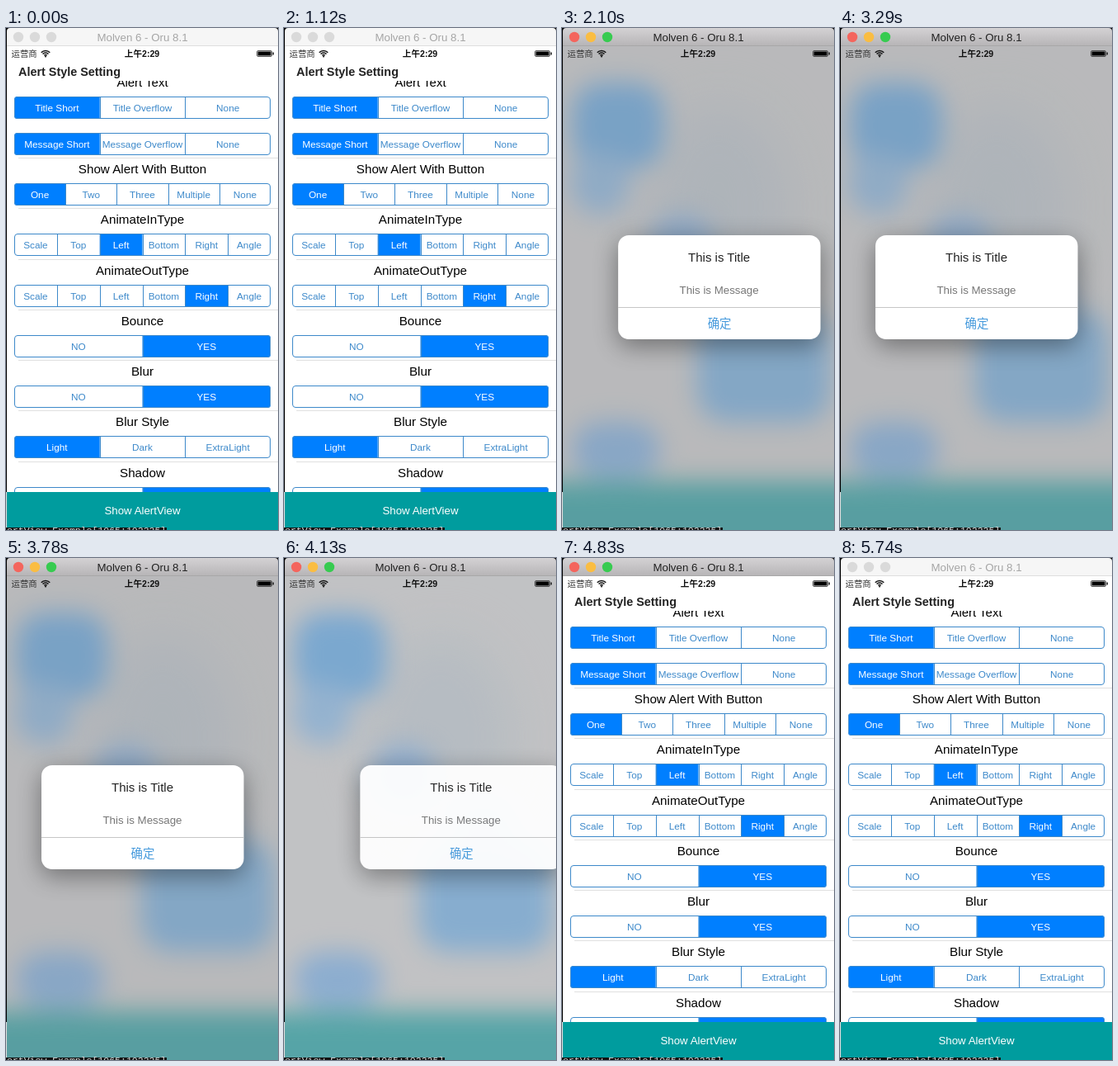
An HTML page that plays this animation: 330x608 px, repeating every 5810 ms.

```html
<!DOCTYPE html>
<html lang="en">
<head>
<meta charset="utf-8">
<title>Alert Style Setting</title>
<style>
  html, body { margin: 0; height: 100%; overflow: hidden; background: #000; }
  svg { display: block; width: 330px; height: 608px; }
  text { font-family: "Liberation Sans", "Noto Sans CJK SC", "Noto Sans CJK", sans-serif; }
</style>
</head>
<body>
<svg id="stage" viewBox="0 0 330 608" xmlns="http://www.w3.org/2000/svg"></svg>
<script>
const LOOP = 5810, STEP = 70;
const CENTER = 165.5;
const BLUE = '#007fff', OUTLINE = '#3d89ca';

const text = (str, x, y, size, fill, extra = 'text-anchor="middle"') =>
  `<text x="${x}" y="${y}" font-size="${size}" fill="${fill}" ${extra}>${str}</text>`;
const rect = (x, y, w, h, fill, extra = '') =>
  `<rect x="${x}" y="${y}" width="${w}" height="${h}" fill="${fill}" ${extra}/>`;

let segmentCount = 0;
function segments(y, labels, selected) {
  const x = 10, width = 311, height = 27;
  const cell = width / labels.length;
  const clip = `segment${segmentCount++}`;
  let out = `<clipPath id="${clip}">${rect(x, y, width, height, '#000', 'rx="3.5"')}</clipPath>`;
  out += rect(x + selected * cell, y, cell, height, BLUE, `clip-path="url(#${clip})"`);
  out += rect(x + .5, y + .5, width - 1, height - 1, 'none', `rx="3.5" stroke="${OUTLINE}"`);
  labels.forEach((label, i) => {
    const left = x + i * cell;
    if (i) out += rect(Math.round(left), y, 1, height, OUTLINE);
    out += text(label, left + cell / 2, y + 17.7, 11.8, i === selected ? '#fff' : OUTLINE);
  });
  return out;
}

const directions = ['Scale', 'Top', 'Left', 'Bottom', 'Right', 'Angle'];
const sections = [
  ['Show Alert With Button', ['One', 'Two', 'Three', 'Multiple', 'None'], 0],
  ['AnimateInType', directions, 2],
  ['AnimateOutType', directions, 4],
  ['Bounce', ['NO', 'YES'], 1],
  ['Blur', ['NO', 'YES'], 1],
  ['Blur Style', ['Light', 'Dark', 'ExtraLight'], 0],
  ['Shadow', ['NO', 'YES'], 1],
];

function settingsPage() {
  let out = rect(1, 22, 329, 586, '#fff');
  out += text('Alert Text', CENTER, 70.5, 15, '#000');
  out += rect(1, 40, 329, 24, '#fff');
  out += text('Alert Style Setting', 15, 58, 14.4, '#222', 'font-weight="bold"');
  out += segments(83, ['Title Short', 'Title Overflow', 'None'], 0);
  out += segments(127, ['Message Short', 'Message Overflow', 'None'], 0);
  sections.forEach(([title, labels, selected], i) => {
    const top = 157 + i * 61.25;
    out += rect(15, Math.round(top), 315, 1, '#e0e0e0');
    out += text(title, CENTER, top + 19, 15.2, '#000');
    out += segments(Math.round(top + 31), labels, selected);
  });
  out += rect(1, 562, 329, 46, '#009c9e');
  return out + text('Show AlertView', CENTER, 589, 13.3, '#fff');
}

function blurredPage() {
  const blobs = [
    [12, 66, 112, 104, '#86c7ff'], [10, 150, 72, 76, '#aad6ff'],
    [106, 226, 78, 78, '#a6cffb'], [202, 292, 80, 80, '#a6d3ff'],
    [164, 342, 161, 135, '#97cfff'], [12, 477, 107, 68, '#9fcfff'],
    [-60, 549, 460, 140, '#50c2c4'],
  ];
  const haze = '<ellipse cx="190" cy="215" rx="85" ry="120" fill="#dbe4eb" filter="url(#haze)"/>';
  return rect(1, 22, 329, 586, '#ecedee') + haze + '<g filter="url(#soft)">' +
    blobs.map(([x, y, w, h, fill]) => rect(x, y, w, h, fill, 'rx="36"')).join('') + '</g>';
}

function alertBox() {
  return rect(43, 251, 245.5, 126, '#000', 'rx="13" opacity=".4" filter="url(#shadow)"') +
    rect(43, 251, 245.5, 126, '#fff', 'rx="13"') +
    rect(43, 338, 245.5, 1, '#c6c6c6') +
    text('This is Title', CENTER, 282.5, 15, '#222') +
    text('This is Message', CENTER, 321.5, 13.3, '#777') +
    text('确定', 166, 362.5, 14.4, '#4499dc');
}

function statusBar() {
  const wifi = [2.2, 4.6, 7].map(r =>
    `<path d="M${48 - r * .75} ${35 - r * .75}A${r} ${r} 0 0 1 ${48 + r * .75} ${35 - r * .75}"
      fill="none" stroke="#111" stroke-width="1.5"/>`).join('');
  return text('运营商', 6.5, 35, 10.4, '#333', '') + wifi +
    '<circle cx="48" cy="34.5" r="1.1" fill="#111"/>' +
    text('上午2:29', 165, 35, 10.6, '#111', 'text-anchor="middle" font-weight="bold"') +
    rect(304.5, 27.5, 18, 7, 'none', 'rx="1.5" stroke="#333" stroke-width=".8"') +
    rect(305.5, 28.5, 16, 5, '#000') + rect(323.5, 29.5, 1.5, 3, '#222');
}

function titleBar(active) {
  const lights = active ? ['#f4655d', '#fabd42', '#37cb50'] : ['#dadada', '#dadada', '#dadada'];
  return '<path d="M1 22V4q0-4 4-4H326q4 0 4 4V22Z" fill="' + (active ? 'url(#chrome)' : '#f6f6f6') + '"/>' +
    rect(1, 21, 329, 1, active ? '#a8a8a8' : '#dedede') +
    lights.map((fill, i) => `<circle cx="${15 + i * 20}" cy="11" r="6.2" fill="${fill}"/>`).join('') +
    text('Molven 6 - Oru 8.1', CENTER, 16, 13.3, active ? '#222' : '#a6a6a6');
}

// Sliver of a terminal window that shows at the bottom edge.
const terminal = () => rect(0, 562, 1, 46, '#ddd') + rect(0, 605, 195, 3, '#111') +
  text('ertView_Example[1065:102335]', 1, 611.5, 11.5, '#ddd',
    'style="font-family:\'Liberation Mono\',monospace"');

const stage = document.getElementById('stage');
const blurFilter = (id, amount) =>
  `<filter id="${id}" x="-60%" y="-60%" width="220%" height="220%" color-interpolation-filters="sRGB">
    <feGaussianBlur stdDeviation="${amount}"/></filter>`;
stage.innerHTML = `<defs>
    ${blurFilter('soft', 15)}${blurFilter('haze', 30)}
    <filter id="shadow" x="-40%" y="-60%" width="180%" height="240%">
      <feOffset dy="8"/><feGaussianBlur stdDeviation="15"/></filter>
    <linearGradient id="chrome" x2="0" y2="1">
      <stop stop-color="#d4d2d4"/><stop offset="1" stop-color="#b6b4b6"/></linearGradient>
    <clipPath id="screen">${rect(1, 22, 329, 586, '#000')}</clipPath>
  </defs>
  ${rect(0, 0, 330, 608, '#000')}
  <g clip-path="url(#screen)">
    ${settingsPage()}
    <g id="overlay">${blurredPage()}
      <rect id="dim" x="1" y="22" width="329" height="586" fill="#656568"/>
      <g id="alert">${alertBox()}</g>
    </g>
    ${statusBar()}
  </g>
  <g id="inactive">${titleBar(false)}</g>
  <g id="active">${titleBar(true)}</g>
  ${terminal()}`;

const [overlay, dim, alertView, inactive, active] =
  ['overlay', 'dim', 'alert', 'inactive', 'active'].map(id => document.getElementById(id));

const clamp = v => Math.min(1, Math.max(0, v));
const easeInOut = p => p * p * (3 - 2 * p);
const show = (node, visible) => node.setAttribute('display', visible ? 'inline' : 'none');

// Remaining distance of an underdamped spring: 1 at the start, 0 when settled.
function spring(seconds) {
  if (seconds <= 0) return 1;
  const omega = 9, damping = .6;
  const wd = omega * Math.sqrt(1 - damping * damping);
  return Math.exp(-damping * omega * seconds) *
    (Math.cos(wd * seconds) + damping * omega / wd * Math.sin(wd * seconds));
}

function render(t) {
  const isActive = t >= 1400 && t < 5390;
  show(active, isActive);
  show(inactive, !isActive);
  show(overlay, t >= 1470 && t < 4550);

  const leaving = easeInOut(clamp((t - 4005) / 475));
  const entering = spring((t - 1614) / 1000);
  const offset = -289 * entering + 288 * leaving;
  dim.setAttribute('opacity', .38 * clamp((t - 1400) / 280) * (1 - leaving));
  alertView.setAttribute('transform', `translate(${offset.toFixed(2)} 0)`);
  alertView.setAttribute('opacity', 1 - .3 * leaving);
  show(alertView, t >= 1610 && t < 4480);
}

function tick() {
  const t = performance.now() % LOOP;
  render(Math.floor(t / STEP) * STEP);
  requestAnimationFrame(tick);
}
tick();
</script>
</body>
</html>
```
